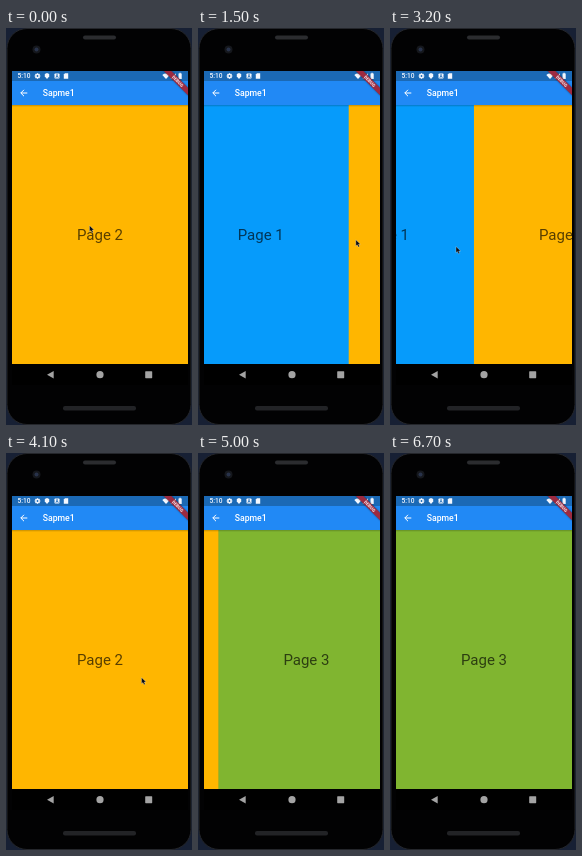
An HTML page with a canvas that plays this animation: 186 by 397 pixels, repeating every 6.8 s.

```html
<!DOCTYPE html>
<html lang="en">
<head>
<meta charset="utf-8">
<title>Page swipe</title>
<style>
html, body { margin: 0; width: 100%; height: 100%; overflow: hidden; background: #000; }
canvas { display: block; width: 186px; height: 397px; }
</style>
</head>
<body>
<canvas id="stage"></canvas>
<script>
const W = 186, H = 397, LOOP = 6800, STEP = 100;
const SCREEN = { x: 6, w: 176, top: 43, bar: 53, body: 77, end: 336 };
const PAGES = ['#069bfb', '#ffb600', '#80b530'];
const FONT = 'Roboto, Arial, sans-serif';

const canvas = document.getElementById('stage');
const ratio = window.devicePixelRatio || 1;
canvas.width = W * ratio;
canvas.height = H * ratio;
const c = canvas.getContext('2d');
c.scale(ratio, ratio);

const linear = k => k;
const easeOut = k => 1 - (1 - k) ** 3;
const easeInOut = k => k * k * (3 - 2 * k);

// Each key: time, values, easing towards that key
const scrollKeys = [
  [0, [1]], [800, [1]], [1100, [0.8]], [1300, [0.6]], [1900, [0], easeOut],
  [2800, [0]], [3000, [0.18]], [3200, [0.557]], [3800, [1], easeOut],
  [4500, [1]], [4800, [1.6]], [5000, [1.918]], [5400, [2], easeOut]
];
const pointerKeys = [
  [0, [83.5, 197.5]], [800, [83.5, 197.5]], [1100, [118.5, 199]],
  [1300, [153, 207]], [1600, [158, 212], easeOut], [2200, [142.5, 217.5], easeInOut],
  [2800, [142.5, 217.5]], [3000, [111, 218]], [3200, [66, 218.5]],
  [3500, [66, 219]], [4100, [135.5, 224.5], easeInOut],
  [4500, [135.5, 224.5]], [4800, [30, 226]], [5000, [-20, 230]]
];
const presses = [[800, 1300], [2800, 3100], [4500, 4800]];

function at(keys, t) {
  const i = keys.findIndex(k => k[0] > t);
  if (i < 0) return keys[keys.length - 1][1];
  const [t0, from] = keys[i - 1], [t1, to, ease = linear] = keys[i];
  const k = ease((t - t0) / (t1 - t0));
  return from.map((v, n) => v + (to[n] - v) * k);
}

function rect(x, y, w, h, fill) {
  c.fillStyle = fill;
  c.fillRect(x, y, w, h);
}

function round(x, y, w, h, r, fill, stroke) {
  c.beginPath();
  c.roundRect(x, y, w, h, r);
  if (fill) { c.fillStyle = fill; c.fill(); }
  if (stroke) { c.strokeStyle = stroke; c.stroke(); }
}

function disc(x, y, r, fill) {
  c.fillStyle = fill;
  c.beginPath();
  c.arc(x, y, r, 0, Math.PI * 2);
  c.fill();
}

function poly(points, fill) {
  c.beginPath();
  points.forEach(([x, y]) => c.lineTo(x, y));
  c.closePath();
  c.fillStyle = fill;
  c.fill();
}

function text(str, x, y, size, weight, fill, align = 'left') {
  c.font = `${weight} ${size}px ${FONT}`;
  c.textAlign = align;
  c.fillStyle = fill;
  c.fillText(str, x, y);
}

function drawPhone() {
  rect(0, 0, W, H, '#172034');
  c.lineWidth = 1;
  round(1, 0.5, 184, 396, 20, '#020203', '#24262b');
  round(77, 7.5, 33, 4, 2, '#2b2c2f');
  round(57, 378, 73, 4.5, 2, '#222326');
  disc(30.5, 21.5, 4, '#15171c');
  disc(30.5, 21.5, 2, '#28324a');
}

function drawPages(scroll) {
  const { x, w, body, end } = SCREEN;
  c.save();
  c.beginPath();
  c.rect(x, body, w, end - body);
  c.clip();
  PAGES.forEach((color, i) => {
    const left = x + (i - scroll) * w;
    if (left >= x + w || left + w <= x) return;
    rect(left, body, w + 0.5, end - body, color);
    text('Page ' + (i + 1), left + w / 2, 212, 15, 400, 'rgba(0,0,0,.66)', 'center');
  });
  c.restore();
}

function drawStatus() {
  const white = '#f4f8ff', blue = '#1b69b5';
  rect(SCREEN.x, SCREEN.top, SCREEN.w, 10, blue);
  text('5:10', 11.5, 50.3, 6.6, 500, white);
  // settings gear
  c.save();
  c.translate(31.5, 48);
  for (let i = 0; i < 4; i++) {
    rect(-0.7, -2.8, 1.4, 5.6, white);
    c.rotate(Math.PI / 4);
  }
  c.restore();
  disc(31.5, 48, 2.1, white);
  disc(31.5, 48, 0.9, blue);
  // shield, keyboard badge, memory card
  poly([[41, 45], [43.2, 46], [43.2, 48.4], [41, 51], [38.8, 48.4], [38.8, 46]], white);
  round(48.5, 45.5, 5, 5, 0.7, white);
  text('A', 51, 49.8, 4.6, 700, blue, 'center');
  poly([[59, 45.2], [62.2, 45.2], [62.2, 50.8], [57.8, 50.8], [57.8, 46.5]], white);
  // wifi, signal, battery
  c.beginPath();
  c.moveTo(160, 51);
  c.arc(160, 51, 5.4, -Math.PI * 0.74, -Math.PI * 0.26);
  c.fillStyle = white;
  c.fill();
  poly([[170, 45.2], [170, 51], [164.5, 51]], white);
  rect(172.5, 45.5, 3.2, 5.5, white);
  rect(173.3, 44.8, 1.6, 1, white);
}

function drawAppBar() {
  rect(SCREEN.x, SCREEN.bar, SCREEN.w, SCREEN.body - SCREEN.bar, '#2189f5');
  c.strokeStyle = '#fff';
  c.lineWidth = 1;
  c.beginPath();
  c.moveTo(21.3, 65); c.lineTo(14.8, 65);
  c.moveTo(18, 61.8); c.lineTo(14.8, 65); c.lineTo(18, 68.2);
  c.stroke();
  text('Sapme1', 36.7, 68, 8.7, 500, '#fff');
  const shade = c.createLinearGradient(0, SCREEN.body, 0, SCREEN.body + 2);
  shade.addColorStop(0, 'rgba(0,0,0,.22)');
  shade.addColorStop(1, 'rgba(0,0,0,0)');
  rect(SCREEN.x, SCREEN.body, SCREEN.w, 2, shade);
}

function drawBanner() {
  c.save();
  c.beginPath();
  c.rect(SCREEN.x, SCREEN.top, SCREEN.w, 40);
  c.clip();
  c.translate(SCREEN.x + SCREEN.w, SCREEN.top);
  c.rotate(Math.PI / 4);
  c.shadowColor = 'rgba(0,0,0,.5)';
  c.shadowBlur = 2;
  rect(-18, 11.8, 36, 5.3, '#9d2a40');
  c.shadowBlur = 0;
  text('DEBUG', 0, 16, 4.4, 900, '#f2dfe4', 'center');
  c.restore();
}

function drawNav() {
  const grey = '#a3a3a3';
  rect(SCREEN.x, SCREEN.end, SCREEN.w, 21, '#000');
  poly([[41, 346.7], [47.7, 342.9], [47.7, 350.5]], grey);
  disc(94, 346.7, 3.6, grey);
  round(139.2, 343.2, 7, 7, 0.6, grey);
}

function drawPointer(t) {
  const [x, y] = at(pointerKeys, t);
  if (x < -10) return;
  if (presses.some(([from, to]) => t > from && t < to)) {
    c.beginPath();
    c.arc(x + 1, y + 1, 8, 0, Math.PI * 2);
    c.fillStyle = 'rgba(255,255,255,.12)';
    c.fill();
    c.strokeStyle = '#16120a';
    c.lineWidth = 1.5;
    c.stroke();
  }
  c.save();
  c.translate(x, y);
  poly([[0, 0], [0, 6.2], [1.4, 5], [2.5, 7.3], [3.7, 6.8], [2.7, 4.5], [4.6, 4.4]], '#0b0d12');
  c.strokeStyle = 'rgba(255,255,255,.55)';
  c.lineWidth = 0.5;
  c.stroke();
  c.restore();
}

function draw(now) {
  const t = Math.floor((now % LOOP) / STEP) * STEP;
  drawPhone();
  drawPages(at(scrollKeys, t)[0]);
  drawStatus();
  drawAppBar();
  drawBanner();
  drawNav();
  drawPointer(t);
}

let start;
function tick(now) {
  start ??= now;
  draw(Math.max(0, now - start));
  requestAnimationFrame(tick);
}
draw(0);
requestAnimationFrame(tick);
</script>
</body>
</html>
```
